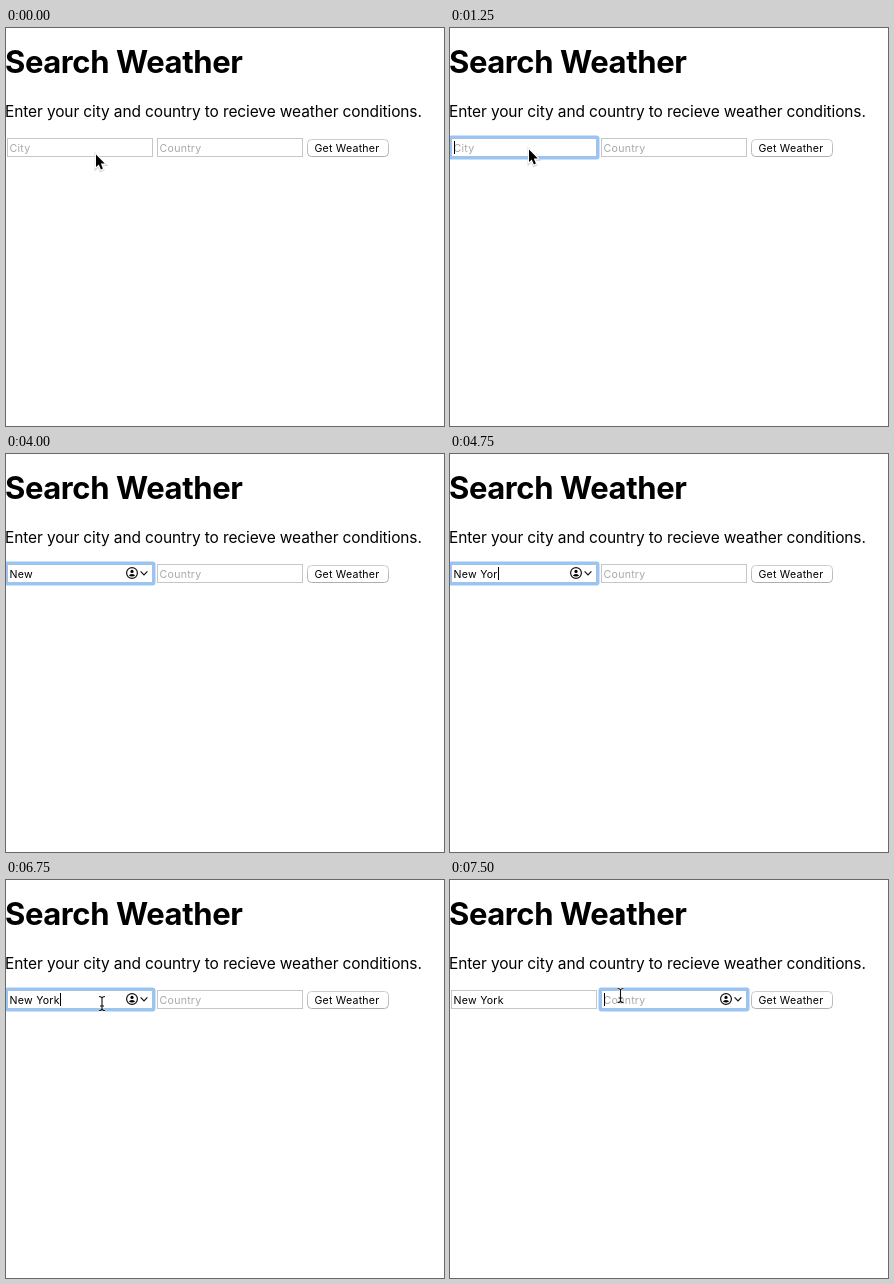
An HTML page that plays this animation: 438x398 px, repeating every 8000 ms.

```html
<!DOCTYPE html>
<html lang="en">
<head>
<meta charset="utf-8">
<title>Search Weather</title>
<style>
  html, body { margin: 0; width: 100%; height: 100%; overflow: hidden; background: #fff; }
  svg { display: block; width: 438px; height: 398px; }
  text { font: 10.6px Inter, "Open Sans", sans-serif; letter-spacing: .23px; font-optical-sizing: none; white-space: pre; }
  .title { font-size: 31px; font-weight: 700; letter-spacing: -.4px; }
  .intro { font-size: 15.5px; letter-spacing: -.12px; }
  .hint { fill: #a9a9a9; }
  .ring { fill: #98c5f5; }
  .box { fill: #fff; stroke: #c6c6c6; }
  .focus .box { stroke: #a3c2e4; }
  .field:not(.focus) .ring, .hidden { visibility: hidden; }
  .line { fill: none; stroke: #111; stroke-width: 1.2; }
  .halo { fill: none; stroke: #fff; stroke-width: 2.4; stroke-linejoin: round; }
</style>
</head>
<body>
<svg viewBox="0 0 438 398">
  <defs>
    <g id="autofill">
      <circle class="line" cx="126" cy="119" r="5.4"/>
      <circle cx="126" cy="117.4" r="1.6"/>
      <path d="M123 121.8Q123.4 120.1 126 120.1T129 121.8Q127.8 122.6 126 122.6T123 121.8Z"/>
      <path class="line" d="M134.6 117.4L138 120.8L141.4 117.4"/>
    </g>
    <path id="beam" d="M-3 -7Q0 -7 0 -5V5Q0 7 -3 7M3 -7Q0 -7 0 -5M0 5Q0 7 3 7M-2 2.5H2"/>
    <path id="pointer" d="M0 0V12.5L2.8 9.9L4.9 14.9L6.9 14L4.8 9.1H8.8Z"/>
    <linearGradient id="edge" x2="0" y2="1">
      <stop offset="0" stop-color="#cdcdcd"/>
      <stop offset="1" stop-color="#aeaeae"/>
    </linearGradient>
  </defs>

  <text class="title" x="-1" y="45">Search Weather</text>
  <text class="intro" x="-1" y="89">Enter your city and country to recieve weather conditions.</text>

  <g class="field" id="city">
    <rect class="ring" x="-1.5" y="107.5" width="151" height="24" rx="3"/>
    <rect class="box" x="1.5" y="110.5" width="145" height="18"/>
    <text x="3.6" y="124"></text>
    <use href="#autofill"/>
  </g>
  <g class="field" id="country" transform="translate(150)">
    <rect class="ring" x="-1.5" y="107.5" width="151" height="24" rx="3"/>
    <rect class="box" x="1.5" y="110.5" width="145" height="18"/>
    <text class="hint" x="3.6" y="124">Country</text>
    <use href="#autofill"/>
  </g>

  <rect x="301.5" y="111.5" width="81" height="17" rx="4" fill="#fff" stroke="url(#edge)"/>
  <text x="308.4" y="124">Get Weather</text>

  <rect id="caret" y="113" width="1" height="13"/>
  <g id="arrow">
    <use href="#pointer" y="1" stroke="#000" stroke-width="3" opacity=".14"/>
    <use href="#pointer" class="halo"/>
    <use href="#pointer"/>
  </g>
  <g id="ibeam">
    <use href="#beam" class="halo"/>
    <use href="#beam" fill="none" stroke="#111" stroke-width="1.1"/>
  </g>
</svg>
<script>
const LOOP = 8000;
const byId = id => document.getElementById(id);
const arrow = (x, y) => ({ cursor: 'arrow', x, y });
const ibeam = (x, y) => ({ cursor: 'ibeam', x, y });
const type = (text, caret) => ({ text, caret });
const blink = (caret = null) => ({ caret });

// Each step changes part of the state and holds until the next one.
const steps = [
  [0, { text: '', caret: null, focus: '', icon: false, ...arrow(90, 126.5) }],
  [250, arrow(80, 124.5)],
  [500, arrow(79, 121.5)],
  [1250, { focus: 'city', caret: 4 }],
  [1750, { icon: true, caret: null, ...ibeam(82.5, 123.5) }],
  [2250, blink(4)],
  [2500, { ...type('N', 12), cursor: '' }],
  [2750, type('New', 27)],
  [3250, type('New ', null)],
  [3500, blink(30)],
  [4000, blink()],
  [4250, type('New Y', 38)],
  [4500, type('New Yo', 43)],
  [4750, type('New Yor', 48)],
  [5500, type('New York', 54)],
  [6000, blink()],
  [6500, { caret: 54, ...ibeam(82.5, 123.5) }],
  [6750, ibeam(96, 123.5)],
  [7000, { caret: null, ...arrow(126, 122) }],
  [7250, ibeam(170.5, 115.5)],
  [7500, { focus: 'country', caret: 154 }]
];

const show = (el, on) => el.classList.toggle('hidden', !on);
const cityText = document.querySelector('#city text');

function render(time) {
  const s = Object.assign({}, ...steps.filter(([at]) => at <= time).map(step => step[1]));

  cityText.textContent = s.text || 'City';
  cityText.classList.toggle('hint', !s.text);

  for (const id of ['city', 'country']) {
    const field = byId(id), focused = s.focus === id;
    field.classList.toggle('focus', focused);
    show(field.querySelector('use'), focused && s.icon);
  }

  show(byId('caret'), s.caret !== null);
  byId('caret').setAttribute('x', s.caret ?? 0);

  for (const id of ['arrow', 'ibeam']) {
    show(byId(id), s.cursor === id);
    byId(id).setAttribute('transform', `translate(${s.x} ${s.y})`);
  }
}

const start = performance.now();
function tick() {
  render((performance.now() - start) % LOOP);
  requestAnimationFrame(tick);
}
tick();
</script>
</body>
</html>
```
